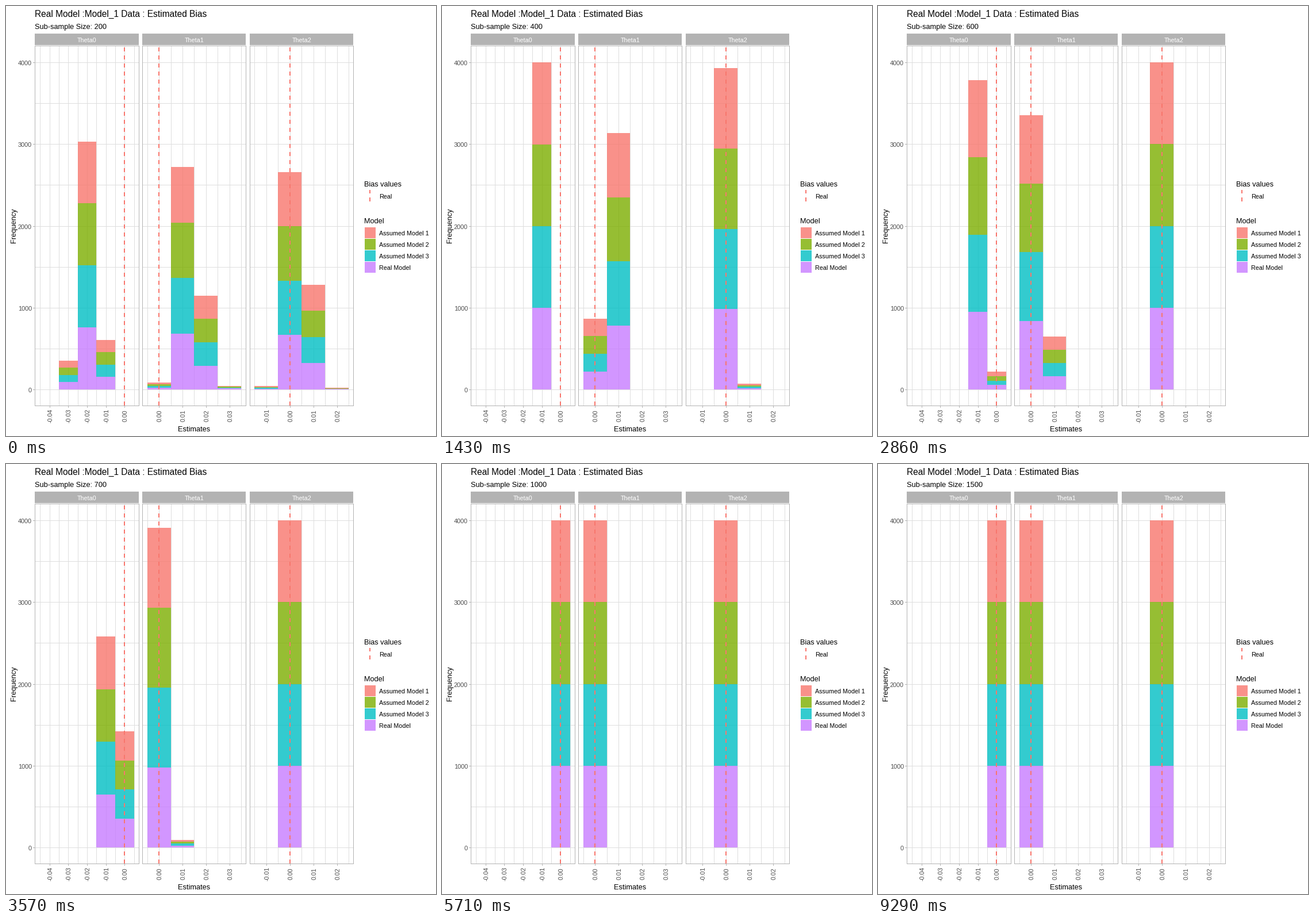
These frames come from a looping animation (748 px wide and 748 px high, 10000 ms). A matplotlib script:

```python
import math

import matplotlib.pyplot as plt
from matplotlib.animation import FuncAnimation
from matplotlib.patches import Rectangle

SIDE, DPI = 748, 64
PT = 72 / DPI                      # points per pixel
LOOP, STEP = 10000, 40
SIZES = range(200, 1501, 100)
TOTAL, RARE = 4000, 10

COLORS = ["#C77CFF", "#00BFC4", "#7CAE00", "#F8766D"]   # bottom to top
MODELS = ["Real Model", "Assumed Model 3", "Assumed Model 2", "Assumed Model 1"]
RED, GREY, GRID, INK = "#F8766D", "#B3B3B3", "#DEDEDE", "#4D4D4D"
TOP, BOTTOM = 69, 695

plt.rcParams["font.family"] = "Liberation Sans"
fig = plt.figure(figsize=(SIDE / DPI, SIDE / DPI), dpi=DPI, facecolor="white")
ax = fig.add_axes([0, 0, 1, 1])
ax.set_xlim(0, SIDE)
ax.set_ylim(SIDE, 0)
ax.axis("off")


def below(z):
    """Normal cumulative share."""
    return 0.5 * (1 + math.erf(z / math.sqrt(2)))


# Share of estimates below edge x (in hundredths) for sub-sample size n.
# The bias shrinks as n grows, and so does its spread on a log or root scale.
def share0(x, n):
    mid = math.log(416.5 * n ** -1.02)
    spread = 0.2157 * (200 / n) ** 0.5
    return 1 - below((math.log(max(-x, 1e-9)) - mid) / spread)


def share1(x, n):
    mid = math.sqrt(269 * n ** -1.014)
    return below((math.sqrt(max(x, 0)) - mid) / (40.5 / n))


def share2(x, n):
    mid = math.sqrt(1.5 + 12500 / n ** 2)
    return below((math.sqrt(max(x + 1.5, 0)) - mid) / (29.9 / n))


# name, share, x of zero, bin width, first and last bin, left and right border
PANELS = [
    ("Theta0", share0, 206.45, 32.73, -4, 0, 50, 231),
    ("Theta1", share1, 266.08, 40.91, 0, 3, 237, 417),
    ("Theta2", share2, 493.7, 40.91, -1, 2, 424, 604),
]


def ypix(count):
    return int(667 - 0.14225 * count + 0.5)


def xpix(panel, unit):
    return int(panel[2] + panel[3] * unit + 0.5)


def rect(x0, y0, x1, y1, color, z=1, alpha=1):
    return ax.add_patch(Rectangle((x0, y0), x1 - x0, y1 - y0, fc=color, lw=0,
                                  alpha=alpha, zorder=z, antialiased=False))


def label(x, y, text, size, color="black", ha="left", turn=0):
    return ax.text(x, y, text, fontsize=size * PT, color=color, ha=ha,
                   va="baseline", rotation=turn, rotation_mode="anchor", zorder=6)


def dashes(x, bottom, top):
    for y in range(bottom, top, -14):
        rect(x - 1, max(y - 7, top), x + 1, y, RED, 3)


def draw_panel(panel):
    name, _, _, _, first, last, left, right = panel
    for count in range(0, TOTAL + 1, 500):
        y = ypix(count)
        rect(left, y, right, y + 1, GRID)
    for half in range(2 * first - 1, 2 * last + 2):
        x = xpix(panel, half / 2)
        rect(x, TOP, x + 1, BOTTOM, GRID)
        if half % 2 == 0:
            rect(x, BOTTOM + 1, x + 1, BOTTOM + 4, GREY)
            label(x + 4.5, 713, f"{half / 200:.2f}", 10.8, INK, "center", 90)
    dashes(xpix(panel, 0), BOTTOM, TOP + 1)
    for x in (left, right):
        rect(x, TOP, x + 1, BOTTOM + 1, GREY, 4)
    for y in (TOP, BOTTOM):
        rect(left, y, right + 1, y + 1, GREY, 4)
    rect(left, 48, right, TOP - 1, GREY, 4)
    label((left + right + 1) / 2, 63, name, 10.7, "white", "center")


def draw_legend():
    label(623, 313.5, "Bias values", 12.7)
    dashes(633, 340, 320)
    label(649, 335, "Real", 10.75)
    label(623, 377.5, "Model", 12.7)
    for i, (name, color) in enumerate(zip(MODELS[::-1], COLORS[::-1])):
        y = 385 + 20 * i
        rect(624, y, 643, y + 19, color, alpha=0.8)
        label(649, y + 14, name, 10.75)


label(50, 19, "Real Model :Model_1 Data : Estimated Bias", 15.5)
subtitle = label(50, 40, "", 12.8)
label(327, 740, "Estimates", 12.8, ha="center")
label(17, 382, "Frequency", 12.8, ha="center", turn=90)
for tick in range(0, TOTAL + 1, 1000):
    rect(47, ypix(tick), 50, ypix(tick) + 1, GREY)
    label(45, ypix(tick) + 5, str(tick), 10.9, INK, "right")
for p in PANELS:
    draw_panel(p)
draw_legend()

bars = []


def draw_bars(panel, n):
    share, first, last = panel[1], panel[4], panel[5]
    for unit in range(first, last + 1):
        lo, hi = unit - 0.5, unit + 0.5
        count = TOTAL * (share(hi, n) - share(lo, n))
        if count < RARE:
            continue
        for k, color in enumerate(COLORS):
            bars.append(rect(xpix(panel, lo), ypix(count * (k + 1) / 4),
                             xpix(panel, hi), ypix(count * k / 4),
                             color, 2, 0.8))


def update(frame):
    while bars:
        bars.pop().remove()
    end = (frame + 1) * STEP - 1
    n = SIZES[end * len(SIZES) // LOOP]
    subtitle.set_text(f"Sub-sample Size: {n}")
    for panel in PANELS:
        draw_bars(panel, n)
    return bars


anim = FuncAnimation(fig, update, frames=LOOP // STEP, interval=STEP,
                     init_func=lambda: update(0), repeat=True, repeat_delay=0,
                     blit=False)
plt.show()
```
